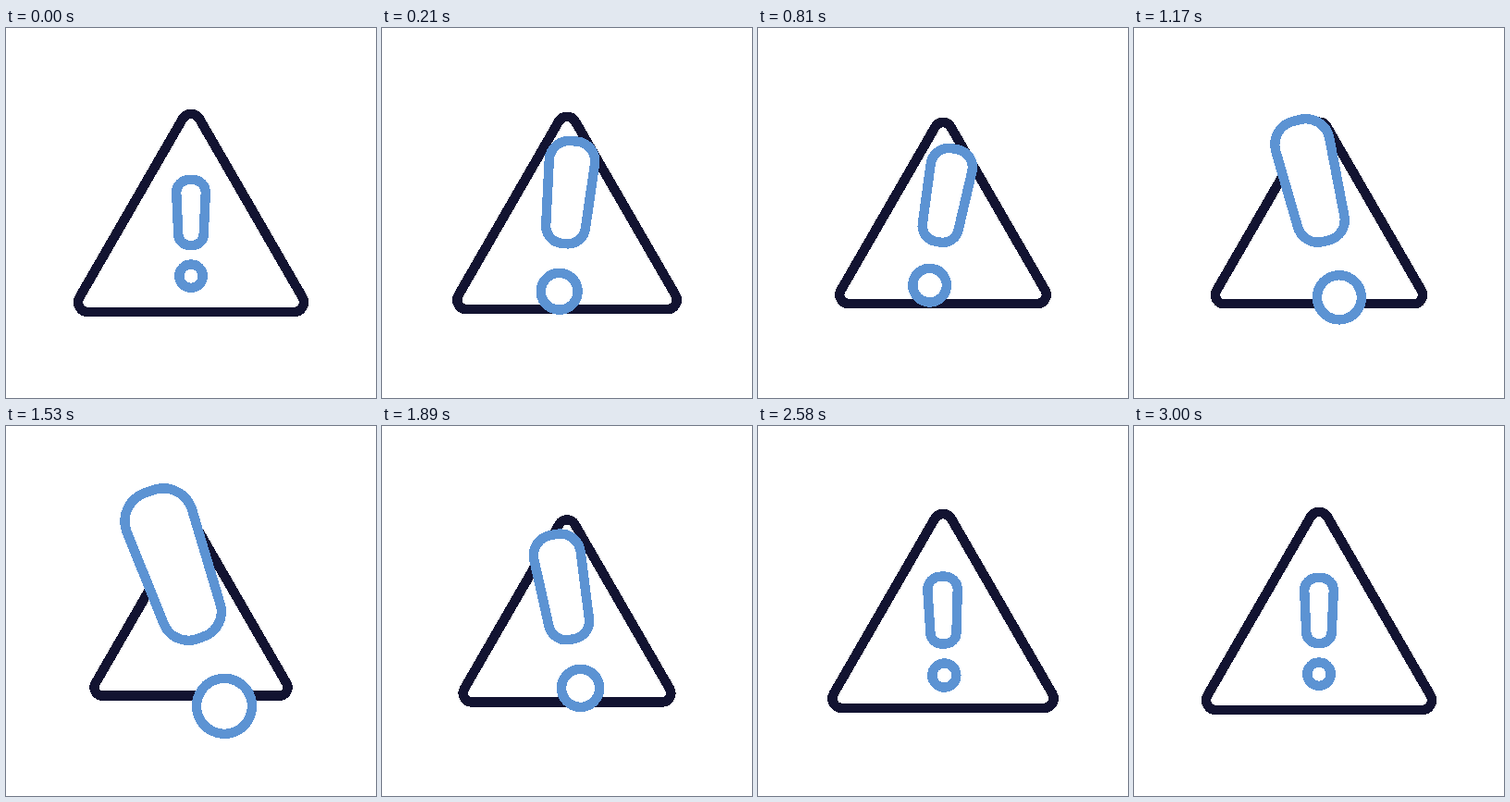
An HTML page for the animation above (5.03 s loop, 400x400 px).

```html
<!DOCTYPE html>
<html lang="en">
<head>
<meta charset="utf-8">
<title>Warning</title>
<style>
  html, body { margin: 0; width: 100%; height: 100%; overflow: hidden; background: #fff; }
  svg { display: block; width: 100%; height: 100%; shape-rendering: crispEdges; }
  path, circle { stroke-width: 10.4; vector-effect: non-scaling-stroke; stroke-linejoin: round; }
  #triangle { fill: none; stroke: #121331; }
  #mark { fill: #fff; stroke: #5c93d3; }
</style>
</head>
<body>
<svg viewBox="0 0 400 400">
  <path id="triangle" d="M-120.6 91.3L-9.1-101.8A10.5 10.5 0 0 1 9.1-101.8L120.6 91.3A10.5 10.5 0 0 1 111.5 107H-111.5A10.5 10.5 0 0 1-120.6 91.3Z"/>
  <g id="mark">
    <path d="M-2-36A13.8 13.8 0 0 0-15.8-22L-13.7 23A12 12 0 0 0-1.7 35H1.7A12 12 0 0 0 13.7 23L15.8-22A13.8 13.8 0 0 0 2-36Z"/>
    <circle cy="68.2" r="12.7"/>
  </g>
</svg>
<script>
const LOOP = 5030, ACTIVE = 3000, STEP = 30;
const REBOUND = .16;

const triangle = document.getElementById('triangle');
const mark = document.getElementById('mark');

// Eased progress from 0 to 1 between two times.
function span(time, from, to) {
  const u = Math.min(1, Math.max(0, (time - from) / (to - from)));
  return u < .5 ? 2 * u * u : 1 - 2 * (1 - u) ** 2;
}

// Strength of each movement: held peak, dip between peaks, side swing, recoil.
function phases(time) {
  const shrink = span(time, 1650, 2140);
  const settle = span(time, 2140, 2450);
  const rest = span(time, 2450, 2930);
  return {
    peak: span(time, 0, 460) - shrink,
    dip: span(time, 460, 925) - span(time, 925, 1390),
    swing: span(time, 0, 460) - 2 * span(time, 460, 1390) + shrink,
    recoil: shrink - (1 + REBOUND) * settle + REBOUND * rest
  };
}

function draw(now) {
  const time = Math.min(ACTIVE, Math.floor((now % LOOP) / STEP) * STEP);
  const body = phases(time), turn = phases(time - 35), frame = phases(time - 70);

  const size = 1 + 1.36 * body.peak - 1.05 * body.dip - .19 * body.recoil;
  const lift = 52 * body.peak - 38 * body.dip - 3 * body.recoil;
  const angle = 19.3 * turn.swing + 7.5 * turn.recoil;
  const frameSize = 1 - .143 * frame.peak + .086 * frame.dip + .123 * frame.recoil;

  triangle.setAttribute('transform', `translate(200 200) scale(${frameSize})`);
  mark.setAttribute('transform',
    `translate(200 200) rotate(${angle}) translate(0 ${-lift}) scale(${size})`);
}

const start = performance.now();
function tick() {
  draw(performance.now() - start);
  requestAnimationFrame(tick);
}
tick();
</script>
</body>
</html>
```
